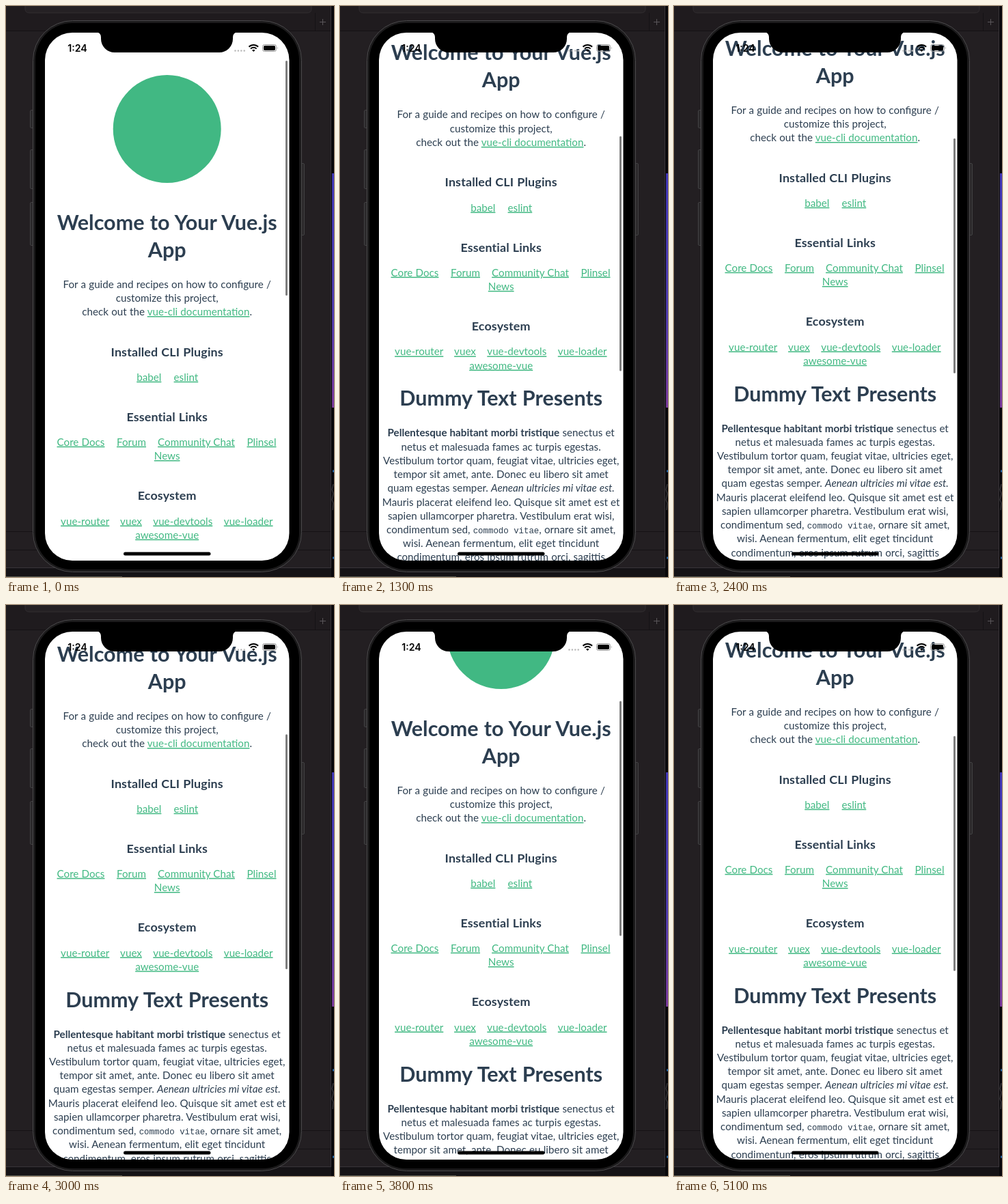
An HTML page that plays this animation: 480 by 836 pixels, repeating every 5200 ms.

```html
<!DOCTYPE html>
<html lang="en">
<head>
<meta charset="utf-8">
<title>Phone scroll</title>
<style>
html, body { margin: 0; width: 100%; height: 100%; overflow: hidden; background: #231f22; }
svg { display: block; width: 480px; height: 836px; }
text { font: 15.2px Lato, sans-serif; fill: #2c3e50; text-anchor: middle; word-spacing: .3px; }
.h1 { font-size: 30.5px; font-weight: 700; word-spacing: .8px; }
.h3 { font-size: 17.9px; font-weight: 700; letter-spacing: .15px; word-spacing: .5px; }
.link { fill: #42b983; text-decoration: underline; text-decoration-thickness: 1px; }
.b { font-weight: 700; }
.i { font-style: italic; }
.code { font: 12.4px "Liberation Mono", monospace; word-spacing: 0; }
.clock { font: 600 14.2px Inter, sans-serif; fill: #000; }
</style>
</head>
<body>
<svg viewBox="0 0 480 836">
  <defs>
    <clipPath id="screen"><rect x="57" y="39" width="357.5" height="773" rx="40"/></clipPath>
    <linearGradient id="strip" x1="0" y1="0" x2="0" y2="1">
      <stop offset="0" stop-color="#4037b8"/>
      <stop offset=".6" stop-color="#4f3cae"/>
      <stop offset="1" stop-color="#7b3a9c"/>
    </linearGradient>
  </defs>

  <!-- desktop behind the phone -->
  <rect width="480" height="836" fill="#231f22"/>
  <rect width="480" height="37" fill="#1f1b1e"/>
  <path d="M28 0V4Q28 10 34 10H441Q447 10 447 4V0" fill="#252124" stroke="#322e31"/>
  <path d="M0 36.5H476M0 769.5H476M0 796.5H476M452.5 10V36" fill="none" stroke="#151215"/>
  <path d="M459 23.5H468M463.5 19V28" stroke="#5a565a"/>
  <rect y="822" width="480" height="14" fill="#151316"/>
  <path d="M0 822.5H480" stroke="#39353a"/>
  <path d="M0 835.5H170" stroke="#55564d"/>
  <rect x="476" width="4" height="836" fill="#08070a"/>
  <path d="M475.5 0V822" stroke="#393539"/>
  <rect x="477" y="245" width="3" height="343" fill="url(#strip)"/>
  <path d="M478 681H480M478 808H480" stroke="#2367a8" stroke-width="3"/>
  <path d="M479 700l-2 8 2 6-2 9 2 5-1 10" fill="none" stroke="#4a484c"/>

  <!-- phone body -->
  <g fill="#2b292b" stroke="#414042">
    <rect x="35.5" y="152.5" width="6" height="26" rx="1.5"/>
    <rect x="35.5" y="210.5" width="6" height="57" rx="1.5"/>
    <rect x="35.5" y="287.5" width="6" height="63" rx="1.5"/>
    <rect x="430.5" y="230.5" width="6" height="105" rx="1.5"/>
  </g>
  <rect x="39.5" y="21.5" width="393" height="807" rx="58" fill="#1b1a1b" stroke="#4b4a4c"/>
  <rect x="43" y="25" width="386" height="800" rx="54" fill="#000"/>
  <rect x="57" y="39" width="357.5" height="773" rx="40" fill="#fff"/>

  <g clip-path="url(#screen)">
    <g id="page"><circle cx="235.7" cy="180" r="79" fill="#41b883"/></g>
    <rect id="bar" x="409" y="80" width="3" height="344" rx="1.5" fill="#7d7d7d"/>
  </g>

  <!-- status bar, notch, home indicator -->
  <path d="M132 38q7 1 7 8v2a20 20 0 0 0 20 20H312a20 20 0 0 0 20-20v-2q0-7 7-8z"/>
  <text class="clock" x="104.5" y="66.5">1:24</text>
  <path d="M335.500 65.500h15" stroke="#b9b9b9" stroke-width="2.600" stroke-linecap="round" stroke-dasharray="0 4.400"/>
  <g fill="none" stroke="#000" stroke-width="2">
    <path d="M355.500 59.700a9.600 9.600 0 0 1 13.600 0M358 62.600a6.100 6.100 0 0 1 8.600 0"/>
  </g>
  <path d="M362.300 67l-2.200-2.300a3.200 3.200 0 0 1 4.400 0z"/>
  <rect x="375.500" y="56.500" width="20" height="10" rx="3" fill="none" stroke="#909090"/>
  <rect x="377" y="58" width="17" height="7" rx="1.700"/>
  <path d="M397 59.700q1.500 1.800 0 3.600z" fill="#909090"/>
  <rect x="172" y="799.5" width="127.500" height="5" rx="2.500"/>
</svg>

<script>
const page = document.getElementById('page');
const bar = document.getElementById('bar');
const MID = 235.7;

function put(cls, y, html, x = MID) {
  const el = document.createElementNS('http://www.w3.org/2000/svg', 'text');
  el.setAttribute('class', cls);
  el.setAttribute('x', x);
  el.setAttribute('y', y);
  el.innerHTML = html;
  page.append(el);
}
const span = (cls, s) => `<tspan class="${cls}">${s}</tspan>`;
const link = (s, x, y) => put('link', y, s, x);

put('h1', 327.5, 'Welcome to Your Vue.js');
put('h1', 367.5, 'App');
put('p', 412.5, 'For a guide and recipes on how to configure /');
put('p', 432.7, 'customize this project,');
put('p', 453, 'check out the ' + span('link', 'vue-cli documentation') + '.');

put('h3', 512.5, 'Installed CLI Plugins');
link('babel', 209.3, 548.7);
link('eslint', 263.4, 548.7);

put('h3', 607.7, 'Essential Links');
link('Core Docs', 109.5, 643.7);
link('Forum', 183.5, 643.7);
link('Community Chat', 278.5, 643.7);
link('Plinsel', 374, 643.7);
link('News', MID, 664);

put('h3', 723.2, 'Ecosystem');
link('vue-router', 115.7, 759.5);
link('vuex', 183, 759.5);
link('vue-devtools', 258.8, 759.5);
link('vue-loader', 354.7, 759.5);
link('awesome-vue', MID, 779.7);

put('h1', 833.5, 'Dummy Text Presents');
[
  span('b', 'Pellentesque habitant morbi tristique') + ' senectus et',
  'netus et malesuada fames ac turpis egestas.',
  'Vestibulum tortor quam, feugiat vitae, ultricies eget,',
  'tempor sit amet, ante. Donec eu libero sit amet',
  'quam egestas semper. ' + span('i', 'Aenean ultricies mi vitae est.'),
  'Mauris placerat eleifend leo. Quisque sit amet est et',
  'sapien ullamcorper pharetra. Vestibulum erat wisi,',
  'condimentum sed, ' + span('code', 'commodo vitae') + ', ornare sit amet,',
  'wisi. Aenean fermentum, elit eget tincidunt',
  'condimentum, eros ipsum rutrum orci, sagittis',
  'tempus lacus enim ac dui. ' + span('link', 'Donec non enim') + ' in',
  'turpis pulvinar facilisis. Ut felis.'
].forEach((s, i) => put('p', 878.6 + i * 20.22, s));

// Scroll gesture: [ms, offset], joined by a smooth curve
const LOOP = 5200, STEP = 100;
const keys = [
  [0, 0], [300, 75], [800, 196], [1200, 228], [1500, 288], [1800, 262],
  [1900, 258], [2150, 240], [2400, 255], [2700, 285], [3000, 245],
  [3600, 180], [3800, 136], [4000, 110], [4400, 222], [4800, 246], [5100, 251]
];

function slope(i) {
  const a = keys[i - 1], b = keys[i + 1];
  return a && b ? (b[1] - a[1]) / (b[0] - a[0]) : 0;
}

function scrollAt(t) {
  const i = Math.min(keys.findLastIndex(k => k[0] <= t), keys.length - 2);
  const [t0, y0] = keys[i], [t1, y1] = keys[i + 1];
  const d = t1 - t0, u = (t - t0) / d, v = 1 - u;
  return y0 + (y1 - y0) * u * u * (3 - 2 * u)
    + d * u * v * (slope(i) * v - slope(i + 1) * u);
}

let start;
function draw(now) {
  start ??= now;
  const t = Math.floor((now - start) % LOOP / STEP) * STEP;
  const y = scrollAt(t);
  page.setAttribute('transform', `translate(0 ${-y})`);
  bar.setAttribute('y', 80 + y * .4457);
  requestAnimationFrame(draw);
}
requestAnimationFrame(draw);
</script>
</body>
</html>
```
